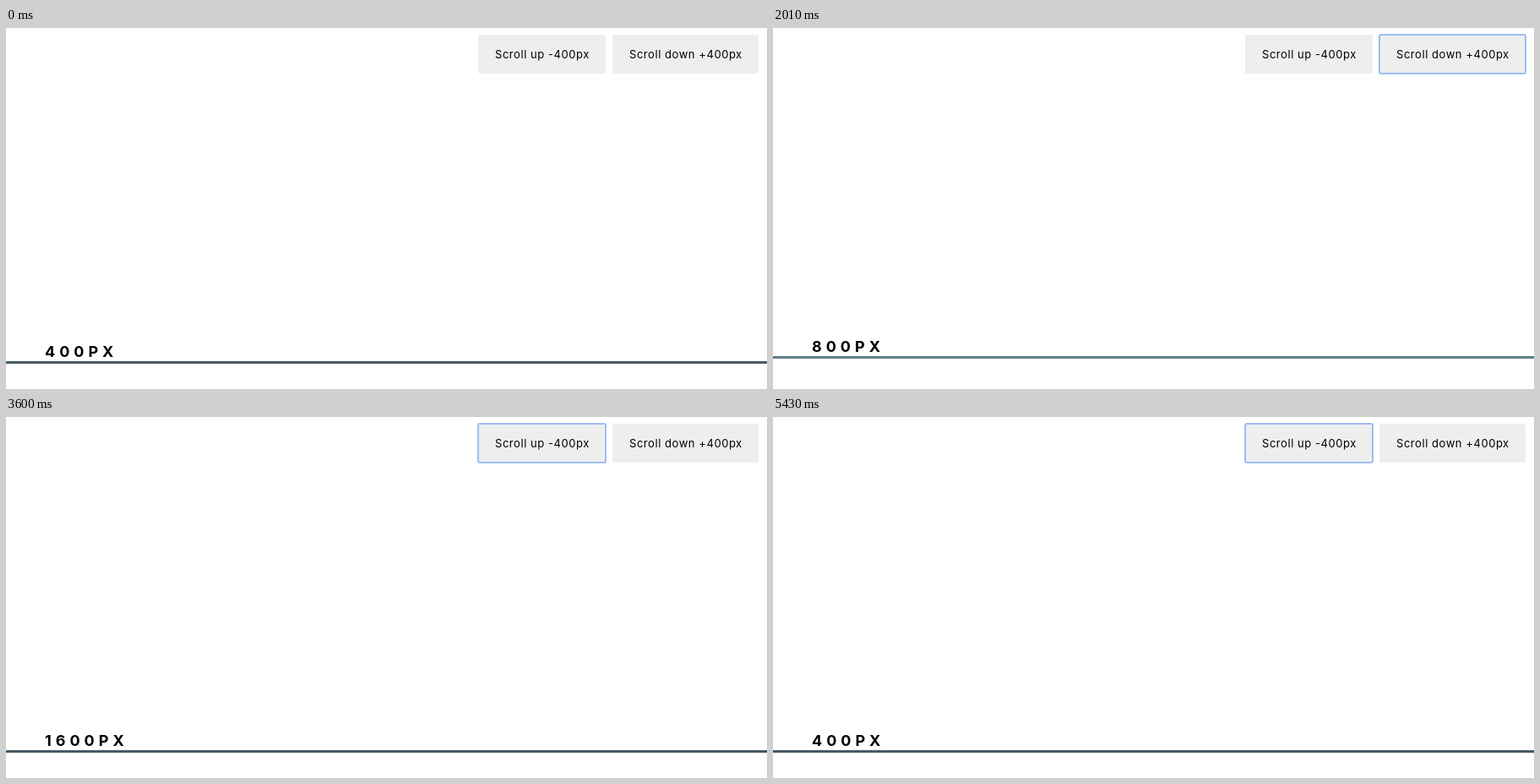
An HTML page that plays this animation: 901 px wide and 428 px high, repeating every 5.55 s.

```html
<!DOCTYPE html>
<html lang="en">
<head>
<meta charset="utf-8">
<title>Scroll by 400px</title>
<style>
  html, body { margin: 0; width: 100%; height: 100%; overflow: hidden; background: #fff; }
  svg { display: block; width: 901px; height: 428px; }
  text { font-family: Inter, sans-serif; }
  .mark { font-size: 18px; font-weight: 700; letter-spacing: 5px; }
  .label { font-size: 13px; letter-spacing: .55px; }
  .button { fill: #eee; }
  .ring { fill: none; stroke: #9dbef5; stroke-width: 2; visibility: hidden; }
</style>
</head>
<body>
<svg viewBox="0 0 901 428">
  <g id="page"></g>
  <g id="buttons"></g>
</svg>
<script>
const LOOP = 5550, TICK = 30, STEP = 400, DURATION = 325;
const FOCUS_DOWN = 930, FOCUS_UP = 3600;
const moves = [
  [979, 1], [1942, 1], [2695.8, 1],
  [3707.2, -1], [4337.2, -1], [5147.2, -1],
];
const page = document.getElementById('page');

['#455a64', '#607d8b', '#cddc39', '#455a64'].forEach((color, i) => {
  const y = STEP * i;
  page.innerHTML += `
    <text class="mark" x="46" y="${y + 390}">${STEP * (i + 1)}PX</text>
    <rect y="${y + 395}" width="901" height="3" fill="${color}"/>`;
});

function addButton(id, x, width, label) {
  const box = `x="${x}" y="8" width="${width}" height="46" rx="2"`;
  document.getElementById('buttons').innerHTML += `
    <rect class="button" ${box}/>
    <text class="label" x="${x + 20}" y="36">${label}</text>
    <rect class="ring" id="${id}" ${box}/>`;
}
addButton('up', 559, 151, 'Scroll up -400px');
addButton('down', 718, 173, 'Scroll down +400px');

const clamp = x => Math.min(1, Math.max(0, x));
const easeInOutQuart = x => x < .5 ? 8 * x ** 4 : 1 - 8 * (1 - x) ** 4;

function showRing(id, visible) {
  document.getElementById(id).style.visibility = visible ? 'visible' : 'hidden';
}

function draw(now) {
  // The screen refreshes in 30 ms ticks and scrolls by whole pixels.
  const time = Math.floor(now % LOOP / TICK) * TICK;
  const scroll = moves.reduce((sum, [start, dir]) =>
    sum + dir * STEP * easeInOutQuart(clamp((time - start) / DURATION)), 0);
  page.setAttribute('transform', `translate(0 ${-Math.floor(scroll)})`);
  showRing('down', time >= FOCUS_DOWN && time < FOCUS_UP);
  showRing('up', time >= FOCUS_UP);
}

let origin;
function frame(now) {
  origin ??= now;
  draw(now - origin);
  requestAnimationFrame(frame);
}
draw(0);
requestAnimationFrame(frame);
</script>
</body>
</html>
```
